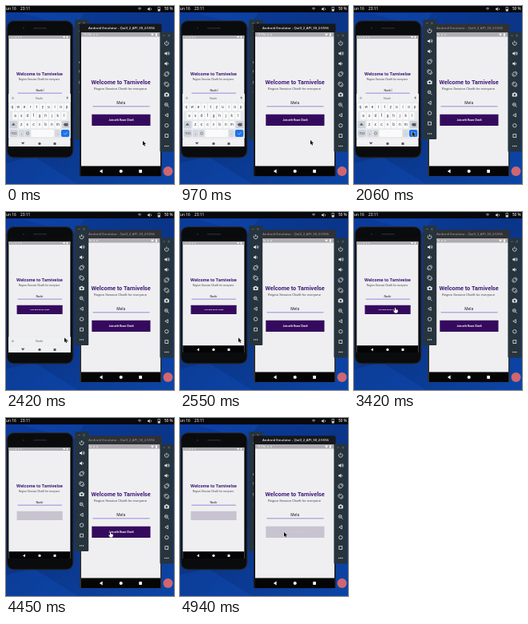
Recreate the animation shown at these times as an HTML page with a canvas. Size 210 by 223 pixels, loop 5000 ms.

```html
<!DOCTYPE html>
<html lang="en">
<head>
<meta charset="utf-8">
<title>Two emulators</title>
<style>
html, body { margin: 0; width: 100%; height: 100%; overflow: hidden; background: #0b3c98; }
canvas { display: block; width: 210px; height: 223px; }
</style>
</head>
<body>
<canvas id="stage"></canvas>
<script>
const W = 210, H = 223, LOOP = 5000;
const canvas = document.getElementById('stage');
const c = canvas.getContext('2d');
const dpr = window.devicePixelRatio || 1;
canvas.width = W * dpr;
canvas.height = H * dpr;

const ROBOTO = 'Roboto, sans-serif';
const UI = '"Open Sans", sans-serif';
const TAU = Math.PI * 2;

function rect(x, y, w, h, fill, r = 0) {
  c.fillStyle = fill;
  c.beginPath();
  c.roundRect(x, y, w, h, r);
  c.fill();
}

function text(s, x, y, size, fill, weight = 400, align = 'center', family = ROBOTO) {
  c.font = `${weight} ${size}px ${family}`;
  c.textAlign = align;
  c.fillStyle = fill;
  c.fillText(s, x, y);
}

function dot(x, y, r, fill) {
  c.fillStyle = fill;
  c.beginPath();
  c.arc(x, y, r, 0, TAU);
  c.fill();
}

function arc(x, y, r, a = 0, b = TAU) {
  c.beginPath();
  c.arc(x, y, r, a, b);
  c.stroke();
}

function path(pts, mode = 'stroke', close = false) {
  c.beginPath();
  pts.forEach(([x, y], i) => i ? c.lineTo(x, y) : c.moveTo(x, y));
  if (close) c.closePath();
  c[mode]();
}

function at(x, y, scale, draw) {
  c.save();
  c.translate(x, y);
  c.scale(scale, scale);
  draw();
  c.restore();
}

function wallpaper() {
  const g = c.createLinearGradient(0, 0, W, H);
  g.addColorStop(0, '#0a3c9e');
  g.addColorStop(0.5, '#0a3588');
  g.addColorStop(1, '#0c45a8');
  c.fillStyle = g;
  c.fillRect(0, 0, W, H);
  c.fillStyle = 'rgba(20,90,215,0.22)';
  path([[0, 197], [34, 188], [90, 223], [0, 223]], 'fill');
  path([[20, 9], [98, 9], [86, 26], [60, 20]], 'fill');
  dot(202.5, 207, 6, '#cf6670');
}

function topBar() {
  rect(0, 0, W, 8, '#08090c');
  text('un 16', 0, 5.1, 4.8, '#ccc', 600, 'left', UI);
  text('23:11', 18, 5.1, 4.8, '#ccc', 600, 'left', UI);
  c.strokeStyle = '#ccc';
  c.lineWidth = 0.8;
  arc(167, 5.2, 2.8, -2.4, -0.75);
  arc(167, 5.2, 1.3, -2.4, -0.75);
  c.fillStyle = '#ccc';
  path([[177, 2.8], [178.2, 2.8], [179.8, 1.5], [179.8, 6], [178.2, 4.7], [177, 4.7]], 'fill');
  arc(179.8, 3.8, 1.8, -0.9, 0.9);
  c.lineWidth = 0.6;
  c.strokeRect(190, 1.6, 2.6, 4.6);
  rect(190, 3.9, 2.6, 2.3, '#ccc');
  text('50 %', 208.5, 5.3, 4.7, '#ddd', 600, 'right', UI);
}

function speaker(waves) {
  path([[-2.6, -1], [-1.2, -1], [0.5, -2.5], [0.5, 2.5], [-1.2, 1], [-2.6, 1]], 'fill', true);
  for (let i = 0; i < waves; i++) arc(0.4, 0, 1.5 + i * 1.4, -0.9, 0.9);
}

function rotation(dir) {
  c.scale(dir, 1);
  at(0, 0, 1, () => {
    c.rotate(-Math.PI / 4);
    c.strokeRect(-1.5, -2.3, 3, 4.6);
  });
  arc(0, 0, 3.2, -1.4, -0.1);
  arc(0, 0, 3.2, 1.7, 3);
}

const TOOLS = [
  () => { arc(0, 0.3, 2.4, -0.9, 4.04); path([[0, -3], [0, 0]]); },
  () => speaker(2),
  () => speaker(1),
  () => rotation(1),
  () => rotation(-1),
  () => {
    rect(-3, -1.8, 6, 4.2, c.strokeStyle, 0.6);
    rect(-1.3, -2.7, 2.6, 1.4, c.strokeStyle);
    dot(0, 0.3, 1.2, '#27343d');
  },
  () => { arc(-0.5, -0.5, 1.9); path([[0.9, 0.9], [2.8, 2.8]]); path([[-1.5, -0.5], [0.5, -0.5]]); },
  () => path([[1.6, -2.1], [-2, 0], [1.6, 2.1]], 'stroke', true),
  () => arc(0, 0, 2.2),
  () => c.strokeRect(-1.9, -1.9, 3.8, 3.8),
  () => [-2, 0, 2].forEach(x => dot(x, 0, 0.65, c.strokeStyle)),
];

function toolbar(x, y) {
  rect(x, y, 17, 150, '#27343d', 0.8);
  c.strokeStyle = '#8d9aa2';
  c.lineWidth = 0.5;
  path([[x + 4, y + 4.5], [x + 6.4, y + 4.5]]);
  path([[x + 10, y + 3.3], [x + 12.4, y + 5.7]]);
  path([[x + 12.4, y + 3.3], [x + 10, y + 5.7]]);
  TOOLS.forEach((draw, i) => at(x + 8.4, y + 14 + i * 12.9, 1, () => {
    c.strokeStyle = c.fillStyle = '#dfe6e9';
    c.lineWidth = 0.8;
    draw();
  }));
}

function navBar(light, keyboard) {
  rect(0, 167.5, 99, 12.5, light ? '#f1f1f4' : '#050506');
  c.fillStyle = light ? '#55565c' : '#f3f3f3';
  if (keyboard) path([[20, 172], [26, 172], [23, 175.5]], 'fill');
  else path([[26.6, 171.5], [26.6, 176.5], [22.8, 174]], 'fill');
  dot(49.7, 174, 2.1, c.fillStyle);
  rect(72.2, 172.1, 3.8, 3.8, c.fillStyle, 0.4);
}

// App screen in its own 99 x 180 space.
function app(name, disabled, caret) {
  rect(0, 0, 99, 180, '#efeff1');
  rect(0, 0, 99, 5.6, '#aeacb1');
  text('11:11', 3, 4.3, 3.2, '#fff', 500, 'left');
  [12, 16, 20].forEach(x => dot(x, 3, 0.8, '#f4f3f6'));
  c.fillStyle = '#fff';
  path([[87, 1.8], [91, 1.8], [89, 4.6]], 'fill');
  rect(93, 1.3, 1.8, 3.4, '#fff', 0.3);

  text('Welcome to Tarnivelse', 49.7, 64.7, 7.3, '#3f1b78', 700);
  text('Region Session ChatIt for everyone', 49, 72.4, 4.25, '#4b4656');
  text(name, 49.7, 89.7, 4.9, '#24222a');
  rect(14.5, 92.4, 71, 0.9, '#786bd0');
  if (caret) rect(56, 85.5, 0.5, 5, '#5a48b8');
  rect(13.3, 102.7, 73.2, 14.4, disabled ? '#c8c3d1' : '#350a5e', 0.5);
  text('Join with Room ChatIt', 50, 111.1, 3.15, disabled ? '#cdc9d5' : '#fff', 700);
}

function keyboard(y) {
  rect(3, y, 79, 56, '#e7e9ec');
  rect(3, y, 79, 10.5, '#eff0f2');
  text('Nadir', 41.5, y + 6.5, 3.8, '#6c6e74');
  dot(8.5, y + 5.3, 1.7, '#cdd0d5');
  c.strokeStyle = '#777b82';
  c.lineWidth = 0.6;
  path([[8, y + 4.3], [9, y + 5.3], [8, y + 6.3]]);
  rect(75.8, y + 3.5, 1.6, 3, '#777b82', 0.8);
  ['qwertyuiop', 'asdfghjkl', 'zxcvbnm'].forEach((row, r) => {
    const x0 = 42 - row.length * 3.8;
    const ky = y + 12 + r * 11;
    [...row].forEach((k, i) => {
      rect(x0 + i * 7.6 + 0.5, ky, 6.6, 9.3, '#fafafb', 1);
      text(k, x0 + i * 7.6 + 3.8, ky + 6.2, 4.8, '#3c3e44');
    });
  });
  const low = y + 34, base = y + 45;
  rect(4.5, low, 9.7, 9.3, '#ced2d9', 1);
  rect(69.8, low, 9.7, 9.3, '#ced2d9', 1);
  c.fillStyle = '#55585f';
  path([[9.3, low + 2.5], [11.7, low + 5.4], [6.9, low + 5.4]], 'fill');
  path([[71.7, low + 4.6], [73.5, low + 2.7], [77.5, low + 2.7], [77.5, low + 6.5], [73.5, low + 6.5]], 'fill');
  rect(4.5, base, 10.5, 9, '#ced2d9', 3);
  text('?123', 9.7, base + 5.7, 3.2, '#4b4f56', 500);
  rect(16.2, base, 6.6, 9, '#d6d9df', 1);
  text(',', 19.5, base + 5.8, 4.5, '#303238');
  rect(23.8, base, 6.6, 9, '#d6d9df', 1);
  c.strokeStyle = '#55585f';
  arc(27.1, base + 4.5, 1.6);
  rect(31.5, base, 28.5, 9, '#fafafb', 1);
  rect(61, base, 6.6, 9, '#d6d9df', 1);
  text('.', 64.3, base + 5.6, 4.5, '#303238');
  rect(68.9, base, 10.4, 9, '#1a73e8', 2);
  c.strokeStyle = '#cfe0fa';
  c.lineWidth = 0.7;
  path([[72.2, base + 4.6], [73.7, base + 6.1], [76.6, base + 3.1]]);
}

function leftPhone(s) {
  rect(0.8, 18.3, 83.4, 172, '#0a0b0d', 9);
  c.strokeStyle = '#34373d';
  c.lineWidth = 0.8;
  c.beginPath();
  c.roundRect(1.2, 18.7, 82.6, 171.2, 8.6);
  c.stroke();
  rect(34, 27, 17, 1.6, '#25272c', 0.8);
  dot(22, 27.8, 1.1, '#1c2836');
  const place = draw => at(3.2, 36.7, 0.78, draw);
  c.save();
  c.beginPath();
  c.rect(3.2, 36.7, 77.6, 139.3);
  c.clip();
  place(() => app('Nadir', s.leftOff, s.caret));
  if (s.keys < 1) keyboard(110 + s.keys * 57);
  place(() => navBar(s.keys < 1, s.keys < 1));
  c.restore();
}

function rightPhone(s) {
  const on = !s.leftFront;
  rect(92, 22.3, 102.5, 191, on ? '#17181b' : '#303135', 1.5);
  text('Android Emulator - Quill_2_API_30_2:5556', 144.5, 29.4, 4.2,
    on ? '#f0f0f0' : '#8e8f93', 600, 'center', UI);
  at(94, 33, 1, () => {
    app('Mela', s.rightOff, false);
    navBar(false, false);
  });
  toolbar(192.4, 32.5);
}

// Pointer stops: time, x, y.
const STOPS = [
  [0, 171, 169], [610, 171, 169], [790, 163, 168], [970, 163, 168], [1600, 73, 157.5],
  [2600, 73, 157.5], [3120, 51, 120], [3820, 51, 120], [4030, 84, 130], [4240, 84, 130],
  [4450, 130, 143], [5000, 130, 143],
];

const ease = p => p * p * (3 - 2 * p);
const clamp = v => Math.min(1, Math.max(0, v));

function pointerAt(t) {
  const i = STOPS.findIndex((p, n) => n && t <= p[0]);
  const [t0, x0, y0] = STOPS[i - 1], [t1, x1, y1] = STOPS[i];
  const p = ease((t - t0) / (t1 - t0));
  return [x0 + (x1 - x0) * p, y0 + (y1 - y0) * p];
}

const ARROW = [[0, 0], [0, 5.6], [1.3, 4.4], [2.2, 6.4], [3.1, 6], [2.2, 4.1], [4, 4]];
const HAND = [[0, 0], [1, 0], [1, 2.2], [3.8, 2.8], [3.8, 4.8], [3, 6.4], [0, 6.4], [-1.7, 3.9], [-1.2, 3.2], [0, 4]];

function pointer(t, s) {
  const [x, y] = pointerAt(t);
  const over = (x0, y0, x1, y1) => x > x0 && x < x1 && y > y0 && y < y1;
  const hand = s.keys === 1 &&
    (!s.leftOff && over(13, 116, 71, 128) || !s.rightOff && over(107, 135.5, 181, 150.5));
  at(x, y, 1, () => {
    c.lineJoin = 'round';
    c.lineWidth = 0.8;
    c.strokeStyle = hand ? '#151515' : '#e8e8e8';
    c.fillStyle = hand ? '#fff' : '#0b0b0b';
    const shape = hand ? HAND : ARROW;
    path(shape, 'stroke', true);
    path(shape, 'fill', true);
  });
}

function draw(t) {
  const s = {
    leftFront: t >= 2040 && t < 4850,
    leftOff: t >= 3640,
    rightOff: t >= 4850,
    keys: clamp((t - 2150) / 300) ** 2,
    caret: t < 2150 && (t + 700) % 1000 >= 500,
  };
  c.setTransform(dpr, 0, 0, dpr, 0, 0);
  wallpaper();
  topBar();
  const left = () => { leftPhone(s); toolbar(86.2, 17); };
  const right = () => rightPhone(s);
  (s.leftFront ? [right, left] : [left, right]).forEach(f => f());
  pointer(t, s);
}

const start = performance.now();
function tick() {
  draw((performance.now() - start) % LOOP);
  requestAnimationFrame(tick);
}
tick();
</script>
</body>
</html>
```
